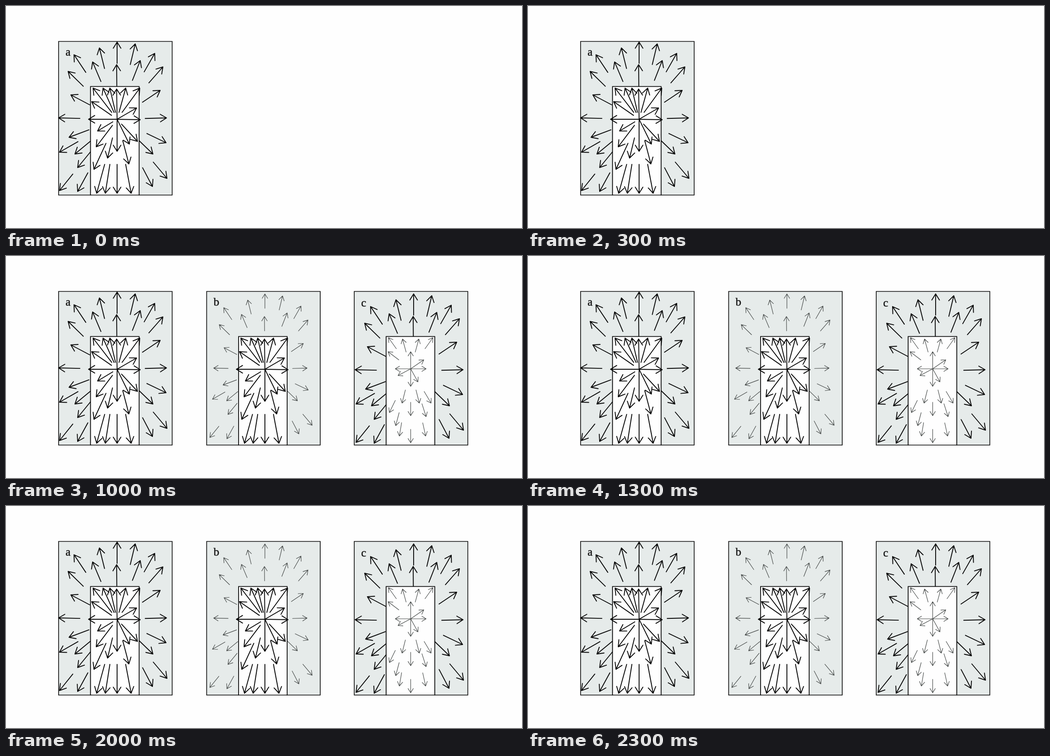
Animation, 1138 px wide and 492 px high, one loop 2.5 s. Source, as an HTML page:

```html
<!DOCTYPE html>
<html lang="en">
<head>
<meta charset="utf-8">
<title>Arrow fields</title>
<style>
  html, body { margin: 0; width: 100%; height: 100%; overflow: hidden; background: #fefefe; }
  svg { display: block; width: 1138px; height: 492px; }
  path { fill: none; stroke-linecap: round; stroke-linejoin: round; }
  .edge { stroke: #080808; stroke-width: 1.6; stroke-linejoin: miter; }
  .strong { stroke: #080808; stroke-width: 1.9; }
  .weak { stroke: #444847; stroke-width: 1.15; }
  text { font: 25px "Liberation Serif", "Times New Roman", serif; fill: #111; stroke: #111; stroke-width: .4; }
</style>
</head>
<body>
<svg id="stage" viewBox="0 0 1138 492"></svg>
<script>
const stage = document.getElementById('stage');
const TOP = 78.5, WIDTH = 250.5, HEIGHT = 340.5;
const CORE = { dx: 70.5, dy: 100, w: 107, h: 240.5 };

// Every arrow points away from its field's centre, so a tip and a tail radius define it
function arrows(tips, tail, head) {
  const at = (x, y) => x.toFixed(1) + ' ' + y.toFixed(1);
  return tips.map(([x, y]) => {
    const r = Math.hypot(x, y), k = tail(r) / r, back = Math.atan2(-y, -x);
    const wing = turn => at(x + head * Math.cos(back + turn), y + head * Math.sin(back + turn));
    return `M${at(x * k, y * k)}L${at(x, y)}M${wing(0.55)}L${at(x, y)}L${wing(-0.55)}`;
  }).join('');
}
const fixed = length => r => r - length;
const share = part => r => r * part;
const row = (y, ...xs) => xs.map(x => [x, y]);
const mirror = tips => tips.flatMap(([x, y]) => [[x, y], [-x, y]]);

// Tips around the core, clockwise from the top, then the nearer three
const ringTips = [
  [0, -171], [40, -167], [83, -146], [101, -116], [95, -64], [109, -3],
  [108, 52], [79, 77], [110, 131], [78, 149], [-87, 160], [-127, 158],
  [-87, 107], [-93, 77], [-127, 73], [-106, 40], [-129, -3], [-102, -54],
  [-108, -106], [-95, -143], [-39, -158], [-54, -127], [-1, -121], [51, -130]
];

// The weak ring keeps the directions and draws the tips in, most at the sides
const weakTips = ringTips.map(([x, y]) => {
  const r = Math.hypot(x, y), k = 1 - (4 + 12 * (x / r) ** 2) / r;
  return [x * k, y * k];
});

const strongRing = arrows(ringTips, fixed(47), 16);
const weakRing = arrows(weakTips, fixed(32), 11.5);

const strongCore =
  arrows([[-63, 0], [51, 1], [-1, -67], [43, -25], [27, 55], [0, 71]], share(0), 16) +
  arrows([...row(-69, -53, -31, -16, 19, 50), [-56, -39], [45, 49], [-43, 26], [-46, 61]], share(0.22), 16) +
  arrows([[-21, 86], [26, 99], [-51, 111]], share(0.48), 16) +
  arrows(row(164, -45, -26, 0, 31), share(0.61), 16);

const weakCore =
  arrows([[0, -38], [-34, 0], [34, 0], [29, -20], [16, 29], [0, 39], [-28, 15]], share(0), 11) +
  arrows([
    ...mirror([[49, -69], [18, -66], [19, 76]]), [-50, -38], [45, 76], [-47, 97],
    [34, 106], [-33, 126], [33, 149], [-25, 149], [0, 104], [0, 164]
  ], fixed(30), 11);

function add(parent, tag, attrs) {
  const el = document.createElementNS('http://www.w3.org/2000/svg', tag);
  for (const k in attrs) el.setAttribute(k, attrs[k]);
  parent.appendChild(el);
  return el;
}

// A layer is a filled outline with its arrows; big is its enlarged corner and scale
function layer(parent, x, y, fill, outline, field, big) {
  const el = add(parent, 'g', {});
  add(el, 'path', { class: 'edge', style: 'fill:' + fill, d: `M0 0${outline}z` });
  add(el, 'path', {
    class: field.style, d: field.d,
    transform: `translate(${field.cx - x} ${field.cy - y})`
  });
  return { el, rest: [x, y, 1], big };
}

function panel({ name, left, labelY, ring, core, ringBig, coreBig }) {
  const g = add(stage, 'g', {});
  const { dx, dy, w, h } = CORE;
  const arch = `h${WIDTH}v${HEIGHT}H${dx + w}v${-h}h${-w}v${h}H0`;
  const outer = layer(g, left, TOP, '#e6ebea', arch, ring, ringBig);
  add(outer.el, 'text', { x: 15.3, y: labelY }).textContent = name;
  const inner = layer(g, left + dx, TOP + dy, '#fefefe', `h${w}v${h}h${-w}`, core, coreBig);
  return { g, layers: [outer, inner] };
}

const field = (style, d, cx, cy) => ({ style, d, cx, cy });
const panels = [
  {
    name: 'a', left: 116, labelY: 31,
    ring: field('strong', strongRing, 245, 251), ringBig: [86, 35.5, 1.249],
    core: field('strong', strongCore, 245, 251), coreBig: [173.6, 160, 1.249]
  },
  {
    name: 'b', left: 442.5, labelY: 31,
    ring: field('weak', weakRing, 571, 251), ringBig: [436, 70, 1.05],
    core: field('strong', strongCore, 571, 251), coreBig: [499.3, 160, 1.249]
  },
  {
    name: 'c', left: 768, labelY: 33,
    ring: field('strong', strongRing, 899, 255), ringBig: [737, 35.5, 1.249],
    core: field('weak', weakCore, 892.5, 250), coreBig: [836.7, 175, 1.05]
  }
].map(panel);

// Panels appear one by one, then all layers grow for one step
function draw(ms) {
  const step = Math.floor(ms % 2500 / 500);
  panels.forEach(({ g, layers }, i) => {
    g.setAttribute('visibility', step >= i ? 'visible' : 'hidden');
    for (const { el, rest, big } of layers) {
      const [x, y, s] = step === 3 ? big : rest;
      el.setAttribute('transform', `translate(${x} ${y}) scale(${s})`);
    }
  });
}

const start = performance.now();
function tick() {
  draw(performance.now() - start);
  requestAnimationFrame(tick);
}
tick();
</script>
</body>
</html>
```
